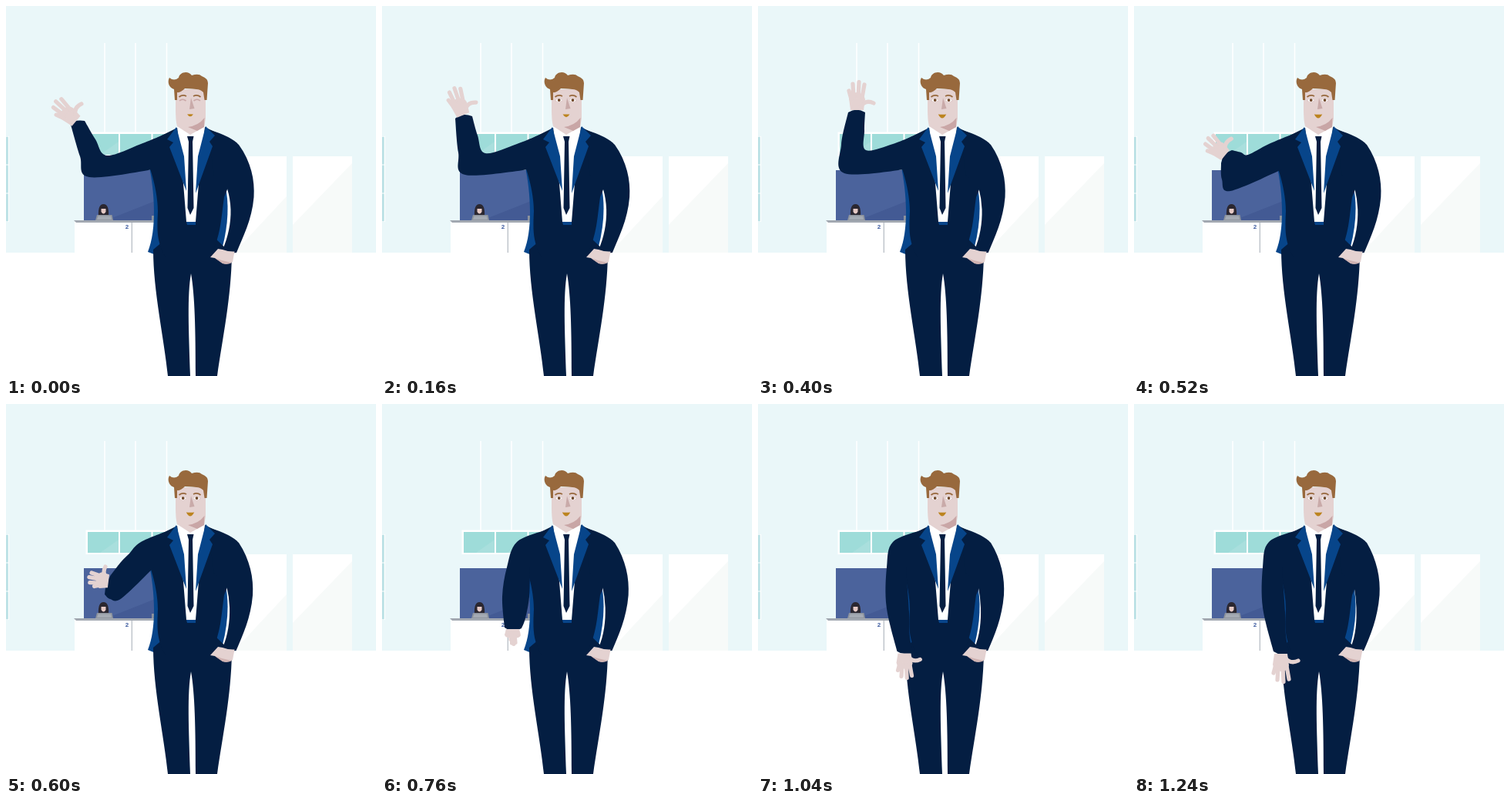
Animation, 480 px wide and 480 px high, one loop 1280 ms. Source, as an HTML page:

```html
<!DOCTYPE html>
<html lang="en">
<head>
<meta charset="utf-8">
<title>Waving man</title>
<style>
html, body { margin: 0; width: 100%; height: 100%; overflow: hidden; background: #fff; }
svg { display: block; width: 100vw; height: 100vh; }
.navy { fill: #041e42; }
.blue { fill: #07458a; }
.skin { fill: #e4d2d1; }
.hair { fill: #98693d; }
</style>
</head>
<body>
<svg viewBox="0 0 480 480">
  <!-- lobby -->
  <rect width="480" height="320" fill="#eaf7f9"/>
  <path d="M128 48V164M168 48V164M208.5 48V164" stroke="#fff" stroke-width="1.5"/>
  <path d="M0 170H3V279H0Z" fill="#bde2e6"/>
  <path d="M0 206H3M0 243H3M3.5 169V280" stroke="#fff" stroke-width="1.2"/>
  <rect x="103.500" y="163.500" width="110" height="31.500" fill="#fff"/>
  <path d="M106 166H146V193H106ZM148 166H188.5V193H148ZM190.5 166H212V193H190.5Z" fill="#9edcd9"/>
  <path d="M122 193L146 176V193ZM162 193L188.5 175V193Z" fill="#a9dfdd"/>
  <rect x="101" y="213" width="110" height="66" fill="#4b639c"/>
  <path d="M130 278L211 246V278Z" fill="#435a94"/>
  <path d="M278 195H364V320H278ZM372 195H449V320H372Z" fill="#fff"/>
  <path d="M364 247V320H296ZM449 204V320H372V284Z" fill="#f7faf9"/>

  <!-- desk -->
  <path d="M120 273Q119 257 126.5 257Q134 257 133 273Z" fill="#2b2730"/>
  <path d="M123.5 263H129.5V267Q126.5 272 123.5 267Z" fill="#e5c9c5"/>
  <path d="M118 271H137.5L139 278H116Z" fill="#8d939d"/>
  <path d="M119.5 272.5H136L137 277H118Z" fill="#a5abb4"/>
  <rect x="189" y="272" width="6" height="6" fill="#8d939d"/>
  <rect x="89" y="280" width="120" height="40" fill="#fff"/>
  <path d="M88 278H210V281H91Z" fill="#a2a8b1"/>
  <path d="M163.3 281V320" stroke="#b4bac2" stroke-width="1.2"/>
  <text x="154.700" y="289.300" font-family="Arial, 'Liberation Sans', sans-serif" font-size="8" font-weight="bold" fill="#3e5ca0">2</text>

  <!-- jacket lining -->
  <path class="blue" d="M185 205C193 240 196 290 184 319Q195 324 207 326L212 300V205Z"/>
  <path class="blue" d="M284 232C290 255 288 285 281 312L264 326L268 290Z"/>
  <!-- trousers and jacket -->
  <path class="navy" d="M191 316C191 370 205 430 210 480H239C237 420 235 375 240 347C245 375 246 420 246 480H274C281 430 292 380 293 322L270 300H210Z"/>
  <path class="navy" d="M222 158L192 173L186 208C195 235 197 255 197 266C196 290 195 305 207 326L264 326C279 300 279 275 283 248L287 238L300 178L258 157Z"/>
  <path class="navy" id="rest"/>
  <path class="skin" d="M281 316Q289 319 296.5 318.5L294 332Q288 336 281 334L271 327L265 326L275 315Z"/>
  <path d="M271 327L281 334Q288 336 293 333L280 330Z" fill="#d0b3b2"/>
  <path class="navy" id="arm"/>
  <g id="hand">
    <path class="skin" id="palm"/>
    <path id="digits" fill="none" stroke="#e4d2d1" stroke-width="5.2" stroke-linecap="round"/>
  </g>

  <!-- shirt, lapels, tie -->
  <path d="M222 157H258L250 230L246 280H234L230 230Z" fill="#fff"/>
  <path class="blue" d="M221 157L209 173L217 177L212 183L234 240L231 195Z"/>
  <path class="blue" d="M259 156L271 168L264 176L268 182L246 243L249 195Z"/>
  <path class="blue" d="M234 280H246V284H235Z"/>
  <path class="navy" d="M235 169H243.5L242 176L243.5 262L239 271L235.5 262L237 176Z"/>

  <!-- head -->
  <path class="skin" d="M220 108H259V146L257 157L239 167L222 156Q220 148 220 135Z"/>
  <path d="M257.5 145L257 157L248 162L236 157Q250 155 257.5 145Z" fill="#c9a6a6"/>
  <path d="M240 119L244.5 133L238 134Z" fill="#c9aaa9"/>
  <path class="hair" d="M219 122L218 108C211 106 209 98 212 93Q218 98 224 93C225 86 236 83 241 90Q250 87 254 91Q262 94 262 100L260.5 122H257.5L256 112Q252 108 247 108Q236 107 232 107Q226 113 222 112V122Z"/>
  <path d="M224.5 118Q229 114.5 234 117M243 117Q248 114.5 252.5 118" fill="none" stroke="#98693d" stroke-width="1.7"/>
  <path d="M225 123Q229 119.5 233.5 123M243.5 123Q248 119.5 252 123" fill="none" stroke="#c9a6a6" stroke-width="1.6"/>
  <g id="eyes">
    <path d="M225 0Q229.5 -4.5 234 0Q229.5 3.5 225 0ZM243 0Q247.5 -4.5 252 0Q247.5 3.5 243 0Z" fill="#fff"/>
    <circle cx="229.700" cy="-.4" r="1.9" fill="#6d4526"/>
    <circle cx="247.500" cy="-.4" r="1.9" fill="#6d4526"/>
  </g>
  <path id="mouth" fill="#bc8420"/>
</svg>
<script>
const LOOP = 1280, STEP = 40;
const $ = id => document.getElementById(id);

const times = [0, 160, 400, 520, 600, 760, 880, 1240];

// Sleeve: inner elbow, forearm, two cuff corners, outer forearm, outer elbow
const sleeve = [
  [131,194, 116,173, 102,149,  84,154,  96,195, 108,222],
  [134,191, 124,168, 117,143,  95,146,  99,190, 108,219],
  [140,187, 138,162, 139,138, 117,138, 108,180, 112,217],
  [148,193, 139,190, 127,187, 113,204, 114,225, 125,240],
  [160,194, 150,204, 142,214, 128,247, 135,253, 150,252],
  [162,212, 156,250, 159,290, 181,291, 186,278, 191,250],
  [167,212, 166,262, 179,320, 200,321, 196,300, 196,270],
  [167,212, 167,264, 181,321, 201,321, 197,300, 196,270]
];

// Hand: angle, length, spread
const turn = [
  [-50, 1, 1], [-22, 1, 1], [0, 1, 1], [-50, .85, 1],
  [-83, .7, .85], [-180, .53, -.3], [-180, .7, -.72], [-180, 1, -1]
];

const clamp = v => Math.max(0, Math.min(1, v));
const mix = (a, b, u) => a + (b - a) * u;
const last = times.length - 1;

// Monotone cubic through the poses, so nothing overshoots
function poseAt(poses, t) {
  let i = 0;
  while (i < last - 1 && t >= times[i + 1]) i++;
  const h = times[i + 1] - times[i], u = clamp((t - times[i]) / h), e = u * u * (3 - 2 * u);
  const secant = (j, k) => (poses[j + 1][k] - poses[j][k]) / (times[j + 1] - times[j]);
  const slope = (j, k) => {
    if (j === last) return 0;
    if (j === 0) return secant(0, k);
    const a = secant(j - 1, k), b = secant(j, k);
    return a * b > 0 ? 2 * a * b / (a + b) : 0;
  };
  return poses[i].map((v, k) => mix(v, poses[i + 1][k], e) +
    h * u * (1 - u) * ((1 - u) * slope(i, k) - u * slope(i + 1, k)));
}

// Smooth curve through points, continuing from the first
function spline(pts) {
  let d = "";
  for (let i = 0; i < pts.length - 1; i++) {
    const b = pts[i], c = pts[i + 1], a = pts[i - 1] || b, e = pts[i + 2] || c;
    d += `C${b.map((v, j) => v + (c[j] - a[j]) / 6)} ${c.map((v, j) => v - (e[j] - b[j]) / 6)} ${c}`;
  }
  return d;
}

function drawArm(t) {
  const v = poseAt(sleeve, t), pts = [];
  for (let i = 0; i < v.length; i += 2) pts.push([v[i], v[i + 1]]);
  const [angle, len, spread] = poseAt(turn, t);
  const [k1, k2] = pts.slice(2, 4);
  const x = (k1[0] + k2[0]) / 2, y = (k1[1] + k2[1]) / 2, r = angle * Math.PI / 180;
  const upper = [[214, 163], [175, 179], ...pts.slice(0, 3)];
  const lower = [...pts.slice(3), [192, 212]];
  const bulge = [x + 7 * Math.sin(r), y - 7 * Math.cos(r)];
  $("arm").setAttribute("d", `M214 163${spline(upper)}Q${bulge} ${k2}${spline(lower)}L214 212Z`);

  const at = (px, py) => `${px} ${py * len}`;
  $("palm").setAttribute("d",
    `M${at(-8, -3)}L${at(-10, -18)}Q${at(-9, -25)} ${at(0, -26)}Q${at(10, -25)} ${at(11, -17)}L${at(9, -3)}Z`);
  const fingers = [[-7, -17, -10, -28], [-4, -20, -5, -37], [2, -20, 3, -39.5], [7, -19, 10, -36]];
  const line = ([a, b, c, d]) => `M${at(a * spread, b)}L${at(c * spread, d)}`;
  $("digits").setAttribute("d", fingers.map(line).join("") +
    `M${at(5 * spread, -8)}Q${at(12 * spread, -17)} ${at(22 * spread, -12)}`);
  $("hand").setAttribute("transform", `translate(${x} ${y}) rotate(${angle})`);
}

function draw(t) {
  drawArm(t);
  const s = 3 * clamp(t / 1240);
  $("rest").setAttribute("d",
    `M262 160Q292 169 302 180C${318 - s} 202 ${323 - s} 226 ${321.5 - s} 248` +
    `C${319 - s} 278 307 300 ${299 - s / 3} 320Q290 321 281 316` +
    `C288 300 ${292 - s} 282 ${291.5 - s} 264Q${291 - s} 250 ${287 - s / 2} 237L270 220Z`);
  $("eyes").setAttribute("transform", `translate(0 122.5) scale(1 ${clamp((t - 20) / 100)})`);
  const smile = clamp(t / 400), w = mix(4, 5.2, smile);
  $("mouth").setAttribute("d",
    `M${239 - w} 140.5Q239 ${mix(140, 141, smile)} ${239 + w} 140.5Q239 ${mix(146, 150.5, smile)} ${239 - w} 140.5Z`);
}

const start = performance.now();
function tick() {
  const t = Math.max(0, performance.now() - start) % LOOP;
  draw(Math.floor(t / STEP) * STEP);
  requestAnimationFrame(tick);
}
draw(0);
requestAnimationFrame(tick);
</script>
</body>
</html>
```
